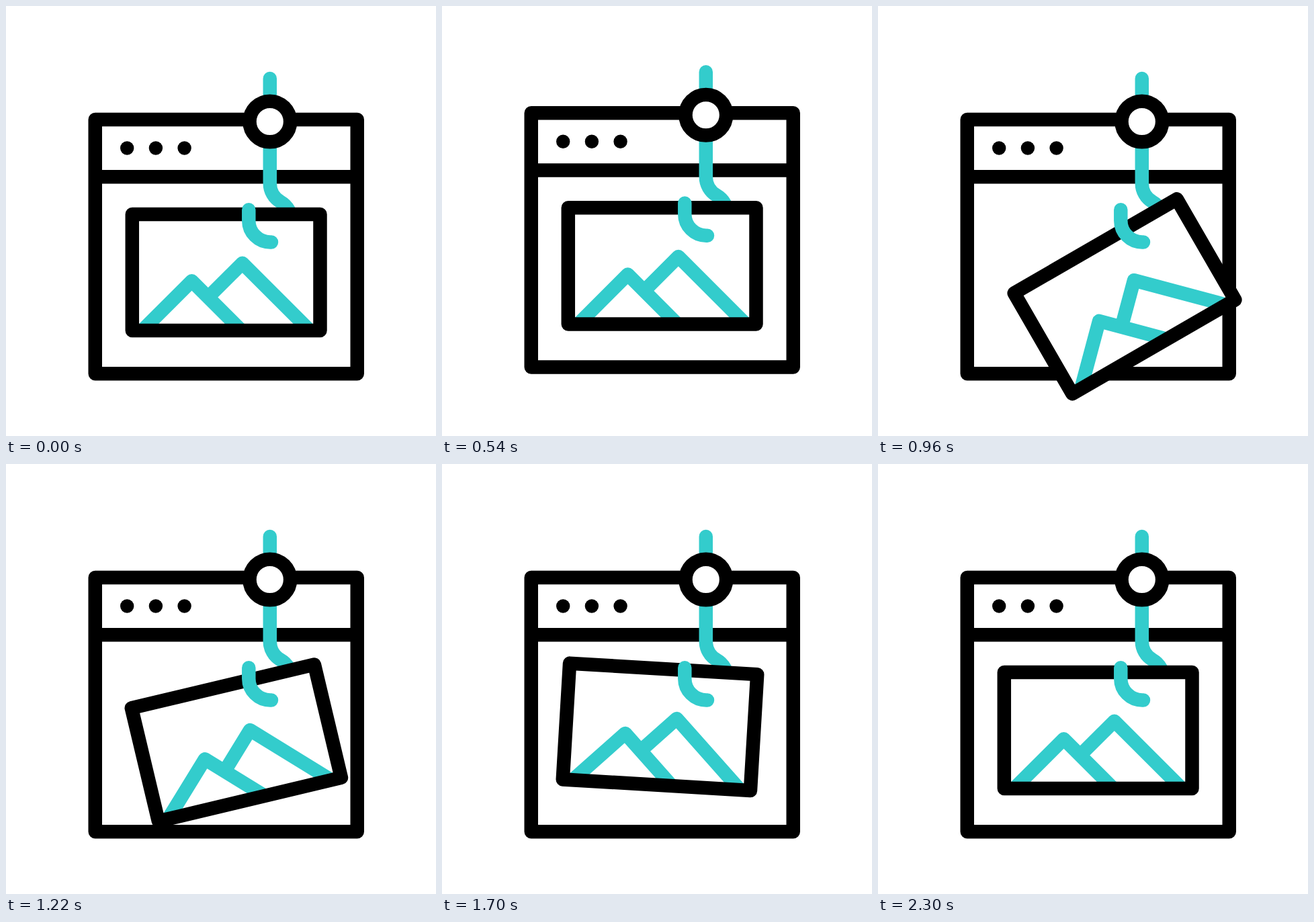
Animation, 640 px wide and 640 px high, one loop 2.4 s. Source, as an HTML page:

```html
<!DOCTYPE html>
<html lang="en">
<head>
<meta charset="utf-8">
<title>Hooked picture</title>
<style>
  html, body { margin: 0; width: 100%; height: 100%; overflow: hidden; background: #fff; }
  svg { display: block; width: 100%; height: 100%; }
  .line { fill: none; stroke: #000; stroke-width: 20.5; stroke-linejoin: round; }
  .solid { fill: #fff; }
  .teal { stroke: #3cc; }
  .round { stroke-linecap: round; }
</style>
</head>
<body>
<svg viewBox="0 0 640 640">
  <g id="scene">
    <rect class="line solid" x="132.75" y="169" width="390" height="378.3"/>
    <path class="line" d="M132.75 254.2H522.75"/>
    <circle cx="180.2" cy="211.5" r="10.2"/>
    <circle cx="222.9" cy="211.5" r="10.2"/>
    <circle cx="265.6" cy="211.5" r="10.2"/>

    <path class="line teal round" d="M392.8 108V264A32 32 0 0 0 408.8 291.7A32 32 0 0 1 424.8 319.4A32 32 0 0 1 392.8 351.2"/>
    <circle class="line solid" cx="392.8" cy="172" r="30.3"/>

    <g id="card">
      <rect class="solid" x="187.8" y="310" width="279.7" height="173.1"/>
      <path class="line teal" d="M202.6 483.1L276.5 409.2L350.4 483.1M300.9 433.6L351.8 382.7L452.2 483.1"/>
      <rect class="line" x="187.8" y="310" width="279.7" height="173.1"/>
    </g>

    <path class="line teal round" d="M361.3 303.2V319.4A32 32 0 0 0 393.3 351.4H395"/>
  </g>
  <path id="upperDash" class="line teal round"/>
  <path id="lowerDash" class="line teal round"/>
</svg>
<script>
const LOOP = 2400, STEP = 20;
const PIVOT = '414 341';

// Keyframes are [time in ms, value].
const LIFT = [[200, 0], [400, -45], [600, 0]];
const SWING = [[600, 0], [900, -32], [1200, -13], [1500, -44], [1800, 20], [2000, 20], [2300, 0]];
const DASH_HEAD = [[1900, 0], [2100, 1]];
const DASH_TAIL = [[2100, 0], [2300, 1]];

const get = id => document.getElementById(id);
const scene = get('scene'), card = get('card');
const upperDash = get('upperDash'), lowerDash = get('lowerDash');

const ease = u => u * u * (3 - 2 * u);

function valueAt(keys, t) {
  if (t <= keys[0][0]) return keys[0][1];
  for (let i = 1; i < keys.length; i++) {
    const [t0, a] = keys[i - 1], [t1, b] = keys[i];
    if (t < t1) return a + (b - a) * ease((t - t0) / (t1 - t0));
  }
  return keys[keys.length - 1][1];
}

function drawDash(path, y, rise, tail, head) {
  const point = u => `${98.6 - 49 * u} ${y + rise * u}`;
  path.setAttribute('d', head > tail ? `M${point(tail)}L${point(head)}` : '');
}

function draw(t) {
  scene.setAttribute('transform', `translate(0 ${valueAt(LIFT, t)})`);
  card.setAttribute('transform', `rotate(${valueAt(SWING, t)} ${PIVOT})`);
  const tail = valueAt(DASH_TAIL, t), head = valueAt(DASH_HEAD, t);
  drawDash(upperDash, 373, -8.2, tail, head);
  drawDash(lowerDash, 416.3, 8.2, tail, head);
}

function tick() {
  const t = performance.now() % LOOP;
  draw(Math.floor(t / STEP) * STEP);
  requestAnimationFrame(tick);
}
tick();
</script>
</body>
</html>
```
